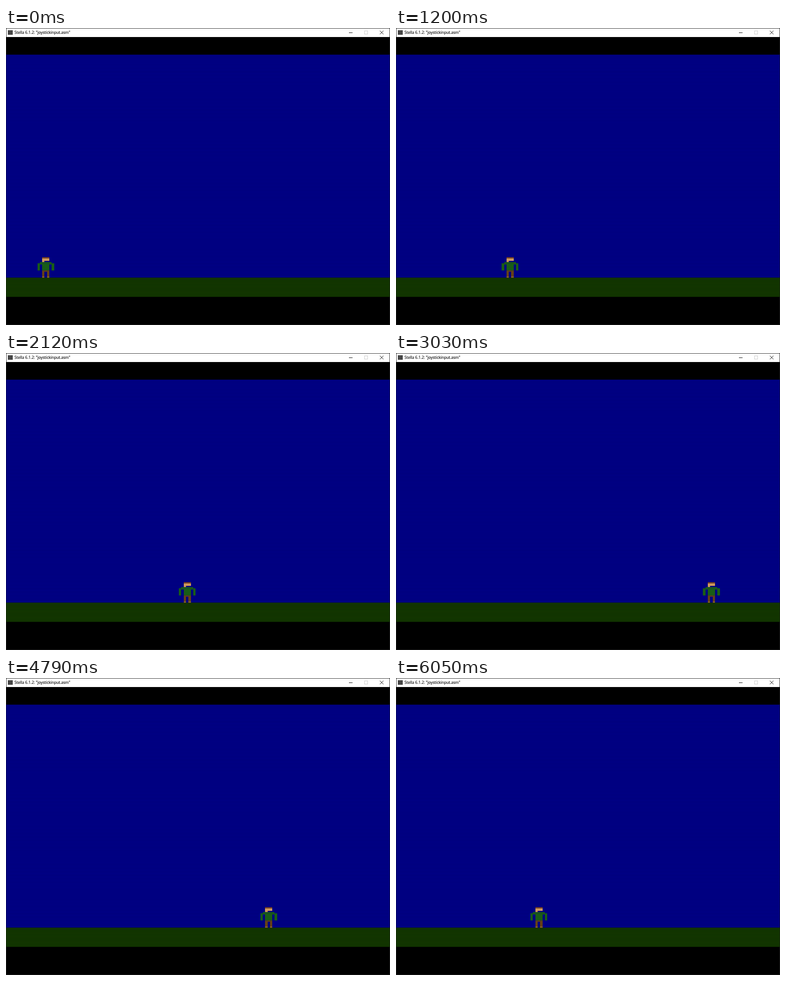
These frames come from a looping animation (851 by 658 pixels, 6.53 s). An HTML page with a canvas:

```html
<!DOCTYPE html>
<html lang="en">
<head>
<meta charset="utf-8">
<title>joystickinput</title>
<style>
  html, body { margin: 0; width: 100%; height: 100%; overflow: hidden; background: #000; }
  canvas, svg { position: absolute; left: 0; top: 0; display: block; }
  text { font: 8.57px "Open Sans", "Noto Sans", sans-serif; fill: #000; stroke: #000; stroke-width: .15; }
</style>
</head>
<body>
<canvas id="screen" width="851" height="658"></canvas>
<svg width="851" height="20" viewBox="0 0 851 20">
  <rect width="851" height="20" fill="#fff"/>
  <path d="M0 .5H851M.5 0V20M850.5 0V20" stroke="#2b2b2b"/>
  <rect x="4" y="5" width="11" height="10" fill="#484848"/>
  <text x="18.7" y="13">Stella 6.1.2: "joystickinput.asm"</text>
  <path d="M760 10.5h8" stroke="#000"/>
  <rect x="794.5" y="6.5" width="7" height="7" fill="none" stroke="#ccc"/>
  <path d="M828.5 6l8 8M836.5 6l-8 8" stroke="#000"/>
</svg>
<script>
const LOOP = 6530;
const FIRST = 315, STEP = 46;      // screen refresh rhythm in ms
const PX = 850 / 160, LINE = PX / 2; // console pixel width, scanline height
const X0 = 0.44, Y0 = 19.3;
const SKY = 15, WALKER = 184, GROUND = 201, END = 217; // scanlines

// Where the walker turns: [ms, column]. He leaves at 134 and re-enters at 9.
const TURNS = [
  [285, 13], [755, 40], [952, 30], [1732, 76], [1957, 63], [3120, 134],
  [3137, 9], [3710, 42], [4285, 9], [4320, 134], [4930, 97], [5015, 97],
  [5155, 106], [6010, 56]
];

// Sprite bands from the top: [lines, colour, bits]
const BANDS = [
  [1, "#96531c", "..###.."],
  [2, "#eeb06c", "..###.."],
  [1, "#eeb06c", "..#...."],
  [1, "#1c6a1a", ".#####."],
  [1, "#1c6a1a", "#######"],
  [5, "#1c6a1a", "#.###.#"],
  [1, "#74491a", "..###.."],
  [4, "#74491a", "..#.#.."],
  [1, "#a8762c", "..#.#.."]
];

const ctx = document.getElementById("screen").getContext("2d");
const xOf = col => X0 + col * PX;
const yOf = line => Y0 + line * LINE;

function columnAt(t) {
  const i = TURNS.findIndex(turn => turn[0] > t);
  if (i === 0) return TURNS[0][1];
  if (i < 0) return TURNS[TURNS.length - 1][1];
  const [t0, a] = TURNS[i - 1], [t1, b] = TURNS[i];
  if (Math.abs(b - a) > 100) return b; // crossing the screen edge
  return Math.round(a + (b - a) * (t - t0) / (t1 - t0));
}

function box(x0, y0, x1, y1, color) {
  ctx.fillStyle = color;
  ctx.fillRect(x0, y0, x1 - x0, y1 - y0);
}

function drawWalker(col) {
  let line = WALKER;
  for (const [count, color, bits] of BANDS) {
    [...bits].forEach((bit, i) => {
      const x = Math.round(xOf(col + i)), end = Math.round(xOf(col + i + 1));
      if (bit === "#") box(x, yOf(line), end, yOf(line + count), color);
    });
    line += count;
  }
}

// The lower half of every scanline is shaded.
function drawScanlines() {
  for (let line = SKY; line < END; line++)
    box(0, yOf(line + 0.5), 851, yOf(line + 1), "rgba(0,0,0,.26)");
}

function draw(col) {
  box(0, 0, 851, 658, "#1c1c1c");
  box(1, 20, 850, 657, "#000");
  box(xOf(0), yOf(SKY), xOf(160), yOf(GROUND), "#000094");
  box(xOf(0), yOf(GROUND), xOf(160), yOf(END), "#143c00");
  drawWalker(col);
  drawScanlines();
}

const start = performance.now();
let shown = -1;
function frame() {
  const t = (performance.now() - start) % LOOP;
  const tick = FIRST + Math.floor((t - FIRST) / STEP) * STEP;
  const col = columnAt(tick);
  if (col !== shown) draw(shown = col);
  requestAnimationFrame(frame);
}
frame();
</script>
</body>
</html>
```
